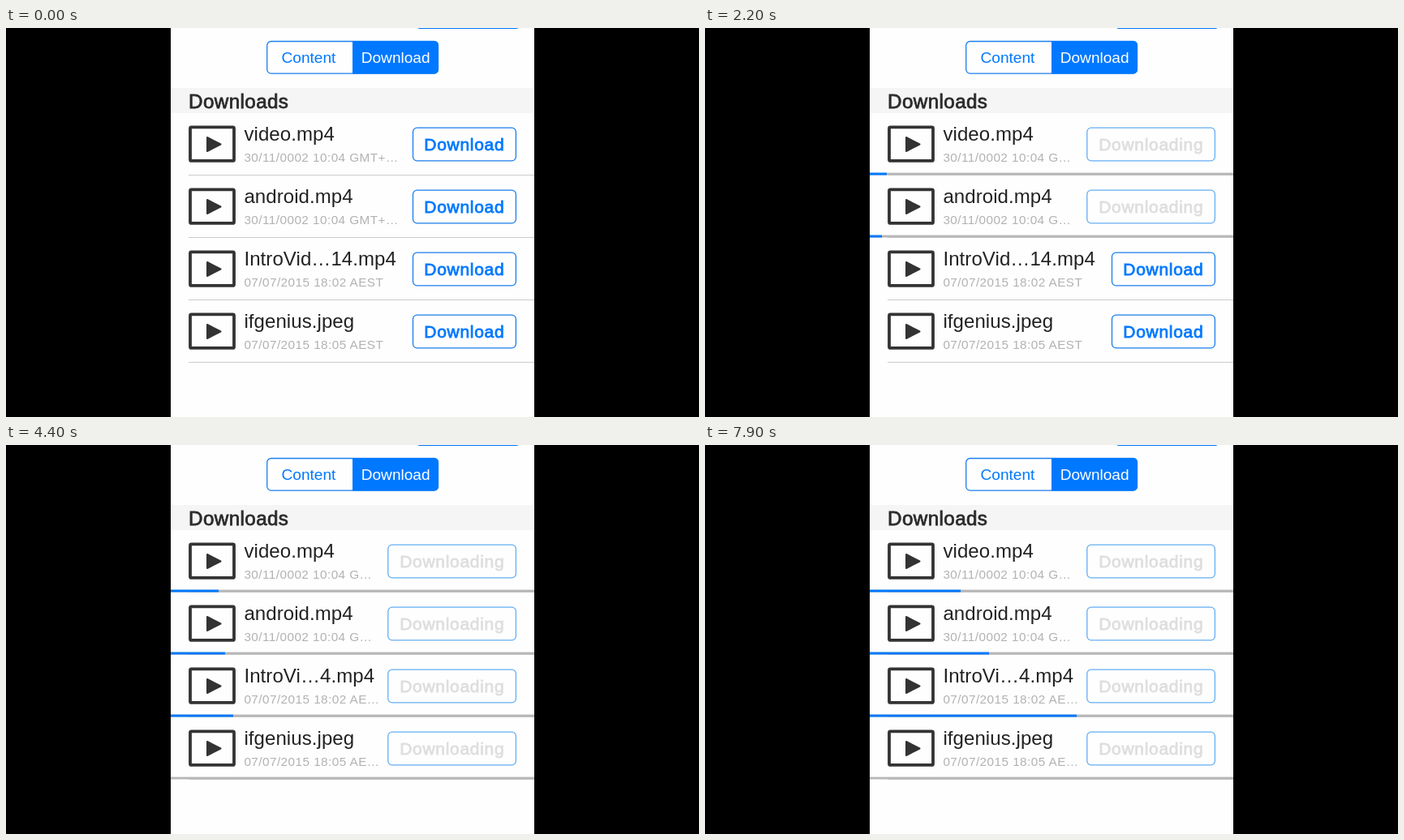
Animation of 854x480 px, one loop 8000 ms. Source, as an HTML page:

```html
<!DOCTYPE html>
<html lang="en">
<head>
<meta charset="utf-8">
<title>Downloads</title>
<style>
  html, body { margin: 0; width: 100%; height: 100%; overflow: hidden; background: #000; }
  svg { display: block; width: 854px; height: 480px; font-family: "Liberation Sans", Arial, sans-serif; }
  .name { font-size: 24px; letter-spacing: .08px; fill: #222; }
  .date { font-size: 15.3px; letter-spacing: .45px; fill: #b2b2b2; }
  .tab { font-size: 19.1px; }
  .medium { stroke-width: .8px; stroke: currentColor; fill: currentColor; }
  .title { font-size: 24.2px; letter-spacing: .4px; color: #2b2b2b; }
  .label { font-size: 21px; letter-spacing: .7px; text-anchor: middle; }
</style>
</head>
<body>
<svg id="stage" viewBox="0 0 854 480"></svg>
<script>
const LOOP = 8000, LEFT = 203, WIDTH = 448, PITCH = 77, FADE = 150;
const BLUE = '#0078ff', EDGE = '#1a7eec', PALE = '#64aef4', GREY = '#dedede';
const stage = document.getElementById('stage');

// start: moment of the tap; bar: [time, width] steps of the progress bar
const rows = [
  { name: 'video.mp4', date: '30/11/0002 10:04 GMT+…', shortDate: '30/11/0002 10:04 G…', start: 1000,
    bar: [[1100, 0], [2200, 21], [2800, 32], [4400, 59], [6500, 91], [7900, 112]] },
  { name: 'android.mp4', date: '30/11/0002 10:04 GMT+…', shortDate: '30/11/0002 10:04 G…', start: 1600,
    bar: [[1700, 0], [2200, 15], [2800, 33], [4400, 67], [6500, 115], [7900, 147]] },
  { name: 'IntroVid…14.mp4', shortName: 'IntroVi…4.mp4', date: '07/07/2015 18:02 AEST',
    shortDate: '07/07/2015 18:02 AE…', start: 2400,
    bar: [[2640, 0], [2800, 7], [4400, 77], [6500, 186], [7900, 255]] },
  { name: 'ifgenius.jpeg', date: '07/07/2015 18:05 AEST', shortDate: '07/07/2015 18:05 AE…', start: 3300,
    bar: [[3400, 0], [7900, 0]] }
];

function add(parent, tag, attrs, text) {
  const el = document.createElementNS('http://www.w3.org/2000/svg', tag);
  set(el, attrs);
  if (text) el.textContent = text;
  return parent.appendChild(el);
}

function set(el, attrs) {
  for (const key in attrs) el.setAttribute(key, attrs[key]);
}

const rect = (parent, x, y, width, height, attrs) =>
  add(parent, 'rect', { x, y, width, height, ...attrs });

function drawFrame() {
  rect(stage, 0, 0, 854, 480, { fill: '#000' });
  rect(stage, LEFT, 0, WIDTH, 480, { fill: '#fefefe' });
  rect(stage, 505.5, -40, 128, 40.3, { rx: 5, fill: 'none', stroke: BLUE, 'stroke-width': 1.4 });
  rect(stage, 321.7, 16.5, 210.8, 39.6, { rx: 5, fill: '#fefefe', stroke: EDGE, 'stroke-width': 1.3 });
  add(stage, 'path', { d: 'M427 16H528a5 5 0 0 1 5 5V51.5a5 5 0 0 1-5 5H427Z', fill: BLUE });
  add(stage, 'text', { x: 339.5, y: 43.1, class: 'tab', fill: BLUE }, 'Content');
  add(stage, 'text', { x: 437.7, y: 43.1, class: 'tab', fill: '#fff' }, 'Download');
  rect(stage, LEFT, 74, WIDTH, 31, { fill: '#f5f5f5' });
  add(stage, 'text', { x: 225.1, y: 98.8, class: 'title medium' }, 'Downloads');
}

function drawRow(row, i) {
  const g = add(stage, 'g', { transform: `translate(0 ${i * PITCH})` });
  rect(g, 227, 122.3, 54, 41.6, { rx: 1.5, fill: 'none', stroke: '#333', 'stroke-width': 3.8 });
  add(g, 'path', { d: 'M248 135V152L264.5 143.5Z', fill: '#333', stroke: '#333',
    'stroke-width': 2, 'stroke-linejoin': 'round' });
  row.title = add(g, 'text', { x: 293.4, y: 138.8, class: 'name' });
  row.when = add(g, 'text', { x: 293.4, y: 164.6, class: 'date' });
  row.box = rect(g, 0, 123.2, 0, 40.6, { rx: 5, fill: 'none', 'stroke-width': 1.3 });
  row.before = add(g, 'text', { y: 151.2, class: 'label medium' }, 'Download');
  row.after = add(g, 'text', { x: 549.8, y: 151.2, class: 'label medium', color: GREY }, 'Downloading');
  rect(g, 225, 181, 426, 1, { fill: '#cbcbcb' });
  row.track = rect(g, LEFT, 178.6, WIDTH, 2.9, { fill: '#b7b7b7' });
  row.fill = rect(g, LEFT, 178.6, 0, 2.9, { fill: BLUE });
}

function valueAt(steps, t) {
  if (t <= steps[0][0]) return steps[0][1];
  let i = 1;
  while (i < steps.length - 1 && t > steps[i][0]) i++;
  const [t0, v0] = steps[i - 1], [t1, v1] = steps[i];
  return v0 + (v1 - v0) * (t - t0) / (t1 - t0);
}

const clamp = v => Math.max(0, Math.min(1, v));

function updateRow(row, t) {
  const age = t - row.start, active = age >= 0;
  row.title.textContent = active && row.shortName || row.name;
  row.when.textContent = active ? row.shortDate : row.date;
  set(row.box, active
    ? { x: 470.8, width: 157.6, stroke: PALE }
    : { x: 501.5, width: 126.9, stroke: EDGE });
  set(row.before, { x: active ? 549.3 : 564.8, color: active ? GREY : BLUE,
    opacity: active ? clamp(1 - age / FADE) : 1 });
  set(row.after, { opacity: clamp(age / FADE - 1) });
  set(row.track, { opacity: active ? 1 : 0 });
  set(row.fill, { width: valueAt(row.bar, t) });
}

drawFrame();
rows.forEach(drawRow);

const began = performance.now();
function tick() {
  const t = (performance.now() - began) % LOOP;
  rows.forEach(row => updateRow(row, t));
  requestAnimationFrame(tick);
}
tick();
</script>
</body>
</html>
```
